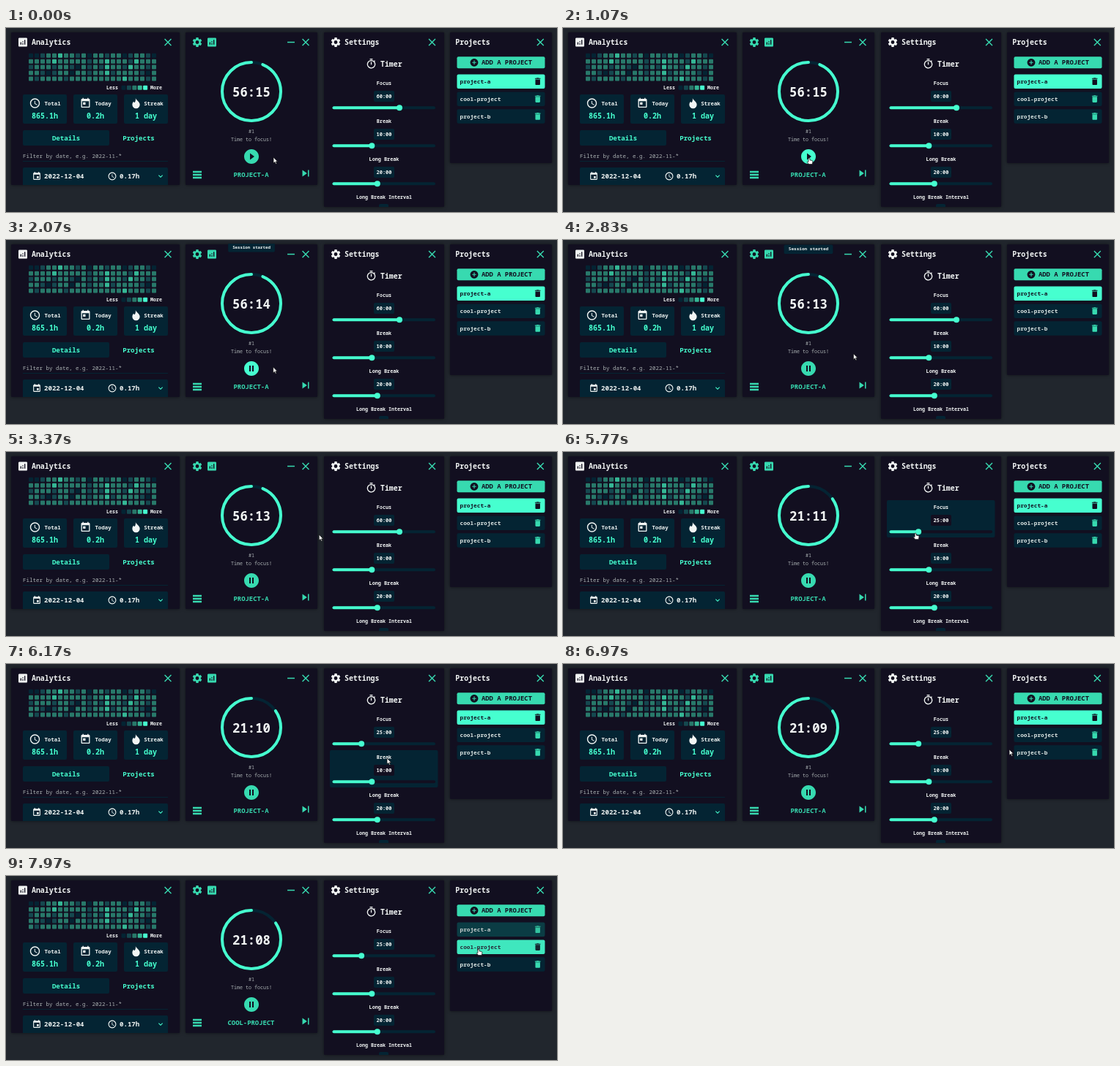
An HTML page for the animation above (8 s loop, 752 by 252 pixels).

```html
<!DOCTYPE html>
<html lang="en">
<head>
<meta charset="utf-8">
<title>Focus timer</title>
<style>
  html, body { margin: 0; width: 100%; height: 100%; overflow: hidden; background: #21262d; }
  svg { display: block; width: 752px; height: 252px; }
  text { font-family: "Noto Sans Mono", "DejaVu Sans Mono", monospace; white-space: pre; }
  .panel { filter: drop-shadow(0 0 2px #0008); }
</style>
</head>
<body>
<svg id="stage" viewBox="0 0 752 252"></svg>
<script>
const ACCENT = '#46ffcf', DIM = '#37dab0', CARD = '#042433', BASE = '#120f20',
      WHITE = '#f2f5f4', SOFT = '#dde5e3', GREY = '#a9b0b1';
const LOOP = 8000;

// Icon outlines on a 24-unit grid
const disc = 'M12 2C6.48 2 2 6.48 2 12s4.48 10 10 10 10-4.48 10-10S17.52 2 12 2z';
const ICONS = {
  gear: 'M19.14 12.94c.04-.3.06-.61.06-.94 0-.32-.02-.64-.07-.94l2.03-1.58c.18-.14.23-.41.12-.61l-1.92-3.32c-.12-.22-.37-.29-.59-.22l-2.39.96c-.5-.38-1.03-.7-1.62-.94l-.36-2.54c-.04-.24-.24-.41-.48-.41h-3.84c-.24 0-.43.17-.47.41l-.36 2.54c-.59.24-1.13.57-1.62.94l-2.39-.96c-.22-.08-.47 0-.59.22L2.74 8.87c-.12.21-.08.47.12.61l2.03 1.58c-.05.3-.09.63-.09.94s.02.64.07.94l-2.03 1.58c-.18.14-.23.41-.12.61l1.92 3.32c.12.22.37.29.59.22l2.39-.96c.5.38 1.03.7 1.62.94l.36 2.54c.05.24.24.41.48.41h3.84c.24 0 .44-.17.47-.41l.36-2.54c.59-.24 1.13-.56 1.62-.94l2.39.96c.22.08.47 0 .59-.22l1.92-3.32c.12-.22.07-.47-.12-.61zM12 15.6a3.6 3.6 0 1 1 0-7.2 3.6 3.6 0 0 1 0 7.2z',
  chart: 'M19 3H5c-1.1 0-2 .9-2 2v14c0 1.1.9 2 2 2h14c1.1 0 2-.9 2-2V5c0-1.1-.9-2-2-2zM9 17H7v-5h2zM13 17h-2v-3h2zM13 12h-2v-2h2zM17 17h-2V7h2z',
  clock: disc + 'M12 20a8 8 0 1 1 0-16 8 8 0 0 1 0 16zM12.5 7H11v6l5.25 3.15.75-1.23-4.5-2.67z',
  today: 'M19 3h-1V1h-2v2H8V1H6v2H5c-1.1 0-2 .9-2 2v14c0 1.1.9 2 2 2h14c1.1 0 2-.9 2-2V5c0-1.1-.9-2-2-2zM19 19H5V8h14zM7 10h5v5H7z',
  event: 'M19 3h-1V1h-2v2H8V1H6v2H5c-1.1 0-2 .9-2 2v14c0 1.1.9 2 2 2h14c1.1 0 2-.9 2-2V5c0-1.1-.9-2-2-2zM19 19H5V8h14zM12 12h5v5h-5z',
  flame: 'M11 1.5C11.5 6 19.5 8.5 19.5 15A7.5 7.5 0 0 1 4.5 15C4.5 12 5.8 9.8 7.2 8.2 7.4 9.7 8.3 10.6 9.3 10.6 11 8.6 11.5 5 11 1.5z',
  timer: 'M15 1H9v2h6zM11 14h2V8h-2zM19.03 7.39l1.42-1.42c-.43-.51-.9-.99-1.41-1.41l-1.42 1.42A9 9 0 1 0 19.03 7.39zM12 20a7 7 0 1 1 0-14 7 7 0 0 1 0 14z',
  add: disc + 'M17 13h-4v4h-2v-4H7v-2h4V7h2v4h4z',
  play: disc + 'M10 16.5v-9l6 4.5z',
  pause: disc + 'M11 16H9V8h2zM15 16h-2V8h2z',
  skip: 'M6 18l8.5-6L6 6zM16 6v12h2V6z',
  close: 'M19 6.41L17.59 5 12 10.59 6.41 5 5 6.41 10.59 12 5 17.59 6.41 19 12 13.41 17.59 19 19 17.59 13.41 12z',
  minus: 'M5 11h14v2H5z',
  rows: 'M21 8H3V4h18zM21 10H3v4h18zM21 16H3v4h18z',
  chevron: 'M16.59 8.59L12 13.17 7.41 8.59 6 10l6 6 6-6z',
  trash: 'M6 19c0 1.1.9 2 2 2h8c1.1 0 2-.9 2-2V7H6zM19 4h-3.5l-1-1h-5l-1 1H5v2h14z'
};

// Markup helpers: icons and text are placed by their visual centre line
const icon = (name, cx, cy, size, fill, id = '') =>
  `<path id="${id}" fill-rule="evenodd" fill="${fill}" d="${ICONS[name]}"
    transform="translate(${cx - size / 2} ${cy - size / 2}) scale(${size / 24})"/>`;
const text = (s, x, y, size, fill, { anchor = 'middle', weight = 600, id = '' } = {}) =>
  `<text id="${id}" x="${x}" y="${y + size * .35}" font-size="${size}" font-weight="${weight}"
    text-anchor="${anchor}" fill="${fill}">${s}</text>`;
const box = (x, y, w, h, fill, r = 2, id = '') =>
  `<rect id="${id}" x="${x}" y="${y}" width="${w}" height="${h}" rx="${r}" fill="${fill}"/>`;
const panel = (name, x, w, h, content) =>
  `<g class="panel">${box(x, 6, w, h, BASE, 1)}</g>
   <clipPath id="${name}Clip">${box(x, 5, w, h + 1, BASE, 1)}</clipPath>
   <g clip-path="url(#${name}Clip)">${content}</g>`;
const left = { anchor: 'start' };

function analytics() {
  const shades = [CARD, '#15484f', '#28796a', '#35b795', ACCENT];
  const days = [
    '0012232212022122012210', '2222322222122322213222', '1222122102121322132212',
    '2210122022122312222102', '2122221222222222322212'];
  const cells = days.map((row, r) => [...row].map((level, c) =>
    box(31 + c * 8, 34.8 + r * 7.9, 6, 6, shades[level], 1)).join('')).join('');
  const legend = shades.map((s, i) => box(157.5 + i * 7.4, 78.7, 6, 6, s, 1)).join('');
  const card = (x, name, size, label, value) =>
    box(x, 91, 60, 40, CARD) + icon(name, x + 16.5, 103, size, WHITE) +
    text(label, x + 40.5, 103, 7.4, WHITE) + text(value, x + 30, 120.6, 10, ACCENT);
  return icon('chart', 23, 19.5, 16, WHITE) + text('Analytics', 35, 19.5, 9.9, WHITE, left) +
    icon('close', 221, 19.5, 17, DIM) + cells + legend +
    text('Less', 145, 81.5, 6.7, WHITE) + text('More', 205, 81.5, 6.7, WHITE) +
    card(23, 'clock', 16, 'Total', '865.1h') + card(92, 'today', 16, 'Today', '0.2h') +
    card(161, 'flame', 16.5, 'Streak', '1 day') +
    box(23, 140, 118, 21, CARD) + text('Details', 82, 150.5, 9.1, ACCENT) +
    text('Projects', 181, 150.5, 9.1, ACCENT) +
    text('Filter by date, e.g. 2022-11-*', 23, 175, 7.5, GREY, { anchor: 'start', weight: 500 }) +
    box(23, 182, 198, 1, CARD, 0) +
    box(23, 191, 198, 40, CARD) + icon('event', 42, 203, 13, WHITE) +
    text('2022-12-04', 52, 203, 9.1, WHITE, left) + icon('clock', 145, 203, 13, WHITE) +
    text('0.17h', 155, 203, 9.1, WHITE, left) + icon('chevron', 211, 203, 12, ACCENT);
}

function timer() {
  return icon('gear', 261, 19.5, 16, DIM) + icon('chart', 281, 19.5, 16, DIM) +
    icon('minus', 389, 19.5, 17, DIM) + icon('close', 409, 19.5, 17, DIM) +
    `<g transform="translate(335 87) scale(-1 1) rotate(-90)" fill="none" stroke-width="4">
      <circle r="40" stroke="${CARD}"/>
      <circle id="ring" r="40" stroke="${ACCENT}" stroke-linecap="round" pathLength="1"/></g>` +
    text('', 335, 87.5, 17.3, WHITE, { id: 'clock' }) +
    text('#1', 335, 142, 6.7, GREY, { weight: 500 }) +
    text('Time to focus!', 335, 153, 6.7, GREY, { weight: 500 }) +
    icon('play', 335, 176, 24, DIM, 'button') + icon('rows', 261, 201, 16, DIM) +
    text('', 334.5, 200.5, 8.9, DIM, { id: 'current' }) + icon('skip', 409, 199, 18, DIM) +
    `<g id="toast">${box(-37, -7, 74, 14, CARD)}${text('Session started', 0, -.5, 6.7, WHITE)}</g>`;
}

function settings() {
  const option = (i, label, value, knob) => {
    const y = 66 + i * 52;
    return box(442, y, 147.5, 51, CARD, 2, 'hover' + i) +
      text(label, 516, y + 9.8, 6.8, WHITE) +
      box(502, y + 20, 28, 15, CARD, 2, 'pill' + i) +
      text(value, 516, y + 27.5, 7, WHITE, { id: 'value' + i }) +
      box(445.5, y + 41.3, 140.5, 4, CARD, 2, 'track' + i) +
      box(445.5, y + 41.3, knob - 445.5, 4, ACCENT, 2, 'fill' + i) +
      `<circle id="knob${i}" cx="${knob}" cy="${y + 43.3}" r="4" fill="${ACCENT}"/>`;
  };
  return icon('gear', 450, 19.5, 16, WHITE) + text('Settings', 462, 19.5, 9.9, WHITE, left) +
    icon('close', 581.5, 19.5, 17, DIM) + icon('timer', 498.5, 49, 15.5, WHITE) +
    text('Timer', 511, 49.5, 9.9, WHITE, left) +
    option(0, 'Focus', '60:00', 537) + option(1, 'Break', '10:00', 499.3) +
    option(2, 'Long Break', '20:00', 506.8) +
    text('Long Break Interval', 516, 232, 6.7, WHITE) + box(509, 241, 13, 15, CARD);
}

function projects() {
  const rows = ['project-a', 'cool-project', 'project-b'].map((name, i) => {
    const y = 63.5 + i * 23.9;
    return box(615.5, y, 120, 19.5, CARD, 2, 'row' + i) +
      text(name, 619.5, y + 9.6, 7.75, SOFT, { anchor: 'start', id: 'name' + i }) +
      icon('trash', 725.7, y + 9.6, 13, DIM, 'trash' + i);
  }).join('');
  return text('Projects', 613.3, 19.5, 9.9, WHITE, left) + icon('close', 729.3, 19.5, 17, DIM) +
    box(615.5, 39.3, 120, 16, DIM) + icon('add', 639, 47.3, 13, BASE) +
    text('ADD A PROJECT', 649, 47.3, 8.85, BASE, left) + rows;
}

const stage = document.getElementById('stage');
stage.innerHTML =
  panel('analytics', 7, 230, 209, analytics()) + panel('timer', 245, 180, 209, timer()) +
  panel('settings', 434, 164, 239, settings()) + panel('projects', 606, 139, 179, projects()) +
  `<g id="cursor" stroke="#111" stroke-width=".7" stroke-linejoin="round" fill="#fff">
    <path id="arrow" d="M0 0V8L1.9 6.4 3.2 9.2 4.5 8.6 3.2 5.9H5.6z"/>
    <path id="hand" d="M-1 .6Q0 -.7 1 .6V3L4 3.5Q5 3.8 4.9 5L4.2 8.6H-.3L-2.8 5.6Q-2.6 4.3-1 5.3z"/></g>`;
const el = {};
stage.querySelectorAll('[id]').forEach(node => { if (node.id) el[node.id] = node; });

const ramp = (t, from, to) => Math.min(1, Math.max(0, (t - from) / (to - from)));
const pulse = (t, on, off, fade) => ramp(t, on, on + fade) - ramp(t, off, off + fade);
const mix = (a, b, p) => `color-mix(in srgb, ${b} ${p * 100}%, ${a})`;
const mmss = s => [s / 60, s % 60].map(n => String(Math.floor(n)).padStart(2, '0')).join(':');

// Pointer stops: time, x, y
const PATH = [
  [70, 365, 177], [230, 364, 172], [500, 364, 172], [830, 355, 181], [1069, 355, 181],
  [1070, 336, 178], [1830, 336, 178], [2070, 364.5, 174], [2230, 389, 166], [2700, 389, 166],
  [3370, 427, 113], [3500, 457, 110], [3900, 509, 109], [4070, 507, 109], [4330, 476, 110],
  [4500, 470, 109], [5300, 470, 109], [5430, 481, 111], [5770, 481, 111], [6170, 520, 129],
  [6630, 520, 129], [6970, 609, 117], [7430, 646, 100], [7610, 646, 100], [7630, 645, 100]];

function pointerAt(t) {
  const i = PATH.findIndex(stop => stop[0] > t);
  if (i === 0) return PATH[0].slice(1);
  if (i < 0) return PATH.at(-1).slice(1);
  const [t0, x0, y0] = PATH[i - 1], [t1, x1, y1] = PATH[i], p = (t - t0) / (t1 - t0);
  return [x0 + (x1 - x0) * p, y0 + (y1 - y0) * p];
}

function draw(t) {
  // Countdown and focus length
  const minutes = Math.round(60 - 35 * ramp(t, 4650, 4880));
  const elapsed = 225 + Math.max(0, Math.floor((t - 830) / 1000));
  const remaining = Math.max(0, minutes * 60 - elapsed);
  el.clock.textContent = mmss(remaining);
  el.ring.setAttribute('stroke-dasharray', `${remaining / (minutes * 60)} 2`);
  const knob = 449.5 + (minutes - 1) / 89 * 132;
  el.value0.textContent = mmss(minutes * 60);
  el.knob0.setAttribute('cx', knob);
  el.fill0.setAttribute('width', knob - 445.5);

  // Start button and toast
  el.button.setAttribute('d', t < 1830 ? ICONS.play : ICONS.pause);
  el.button.style.fill = mix(DIM, ACCENT, t < 1070 ? 0 : 1 - ramp(t, 2070, 2230));
  const shown = ramp(t, 1830, 2230) - ramp(t, 2720, 3120);
  el.toast.setAttribute('transform', `translate(335 ${-1 + 19 * shown}) scale(${.65 + .35 * shown})`);
  el.toast.style.opacity = Math.min(1, shown * 2);

  // Hovered setting
  [pulse(t, 3560, 5860, 150), pulse(t, 5890, 6720, 150), 0].forEach((p, i) => {
    el['hover' + i].style.opacity = p;
    el['pill' + i].style.fill = el['track' + i].style.fill = mix(CARD, BASE, p);
  });

  // Selected project
  const swap = ramp(t, 7740, 8000);
  [1 - swap, swap, 0].forEach((p, i) => {
    el['row' + i].style.fill = mix(CARD, ACCENT, p);
    el['name' + i].style.fill = mix(SOFT, BASE, p);
    el['trash' + i].style.fill = mix(DIM, BASE, p);
  });
  el.current.textContent = t < 7770 ? 'PROJECT-A' : 'COOL-PROJECT';

  const isHand = [[1070, 1910], [3600, 5900], [7060, LOOP]].some(([a, b]) => t >= a && t < b);
  el.arrow.style.display = isHand ? 'none' : '';
  el.hand.style.display = isHand ? '' : 'none';
  el.cursor.setAttribute('transform', `translate(${pointerAt(t)})`);
}

const start = performance.now();
function tick() {
  draw((performance.now() - start) % LOOP);
  requestAnimationFrame(tick);
}
tick();
</script>
</body>
</html>
```
